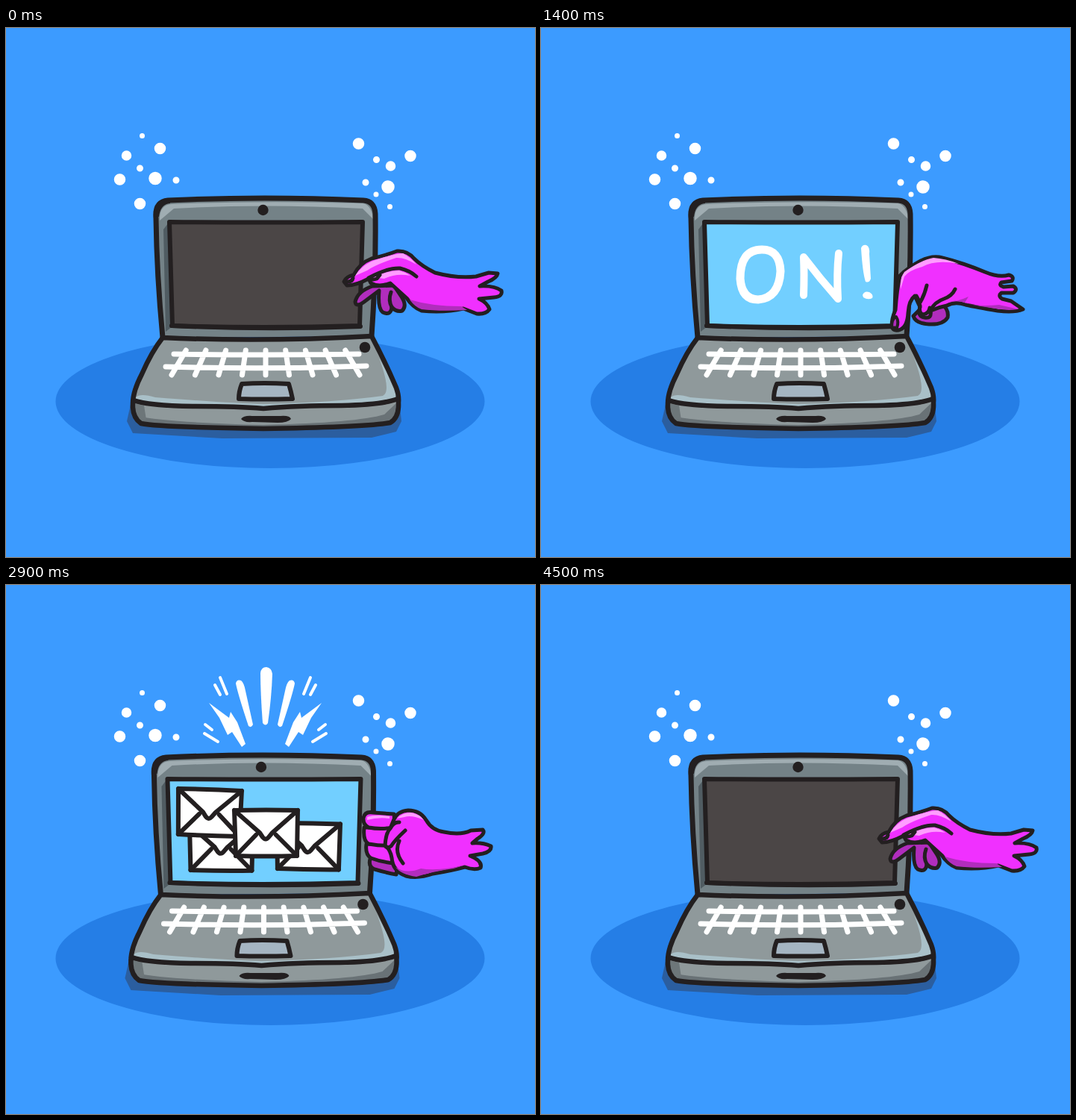
Animation, 709 px wide and 709 px high, one loop 5.5 s. Source, as an HTML page:

```html
<!DOCTYPE html>
<html lang="en">
<head>
<meta charset="utf-8">
<title>Laptop mail</title>
<style>
  html, body { margin: 0; width: 100%; height: 100%; overflow: hidden; background: #3c9bff; }
  svg { display: block; width: 100vw; height: 100vh; }
  .ink { stroke: #231f20; stroke-width: 6; stroke-linejoin: round; stroke-linecap: round; }
  .thin { stroke-width: 5; }
  .line { fill: none; }
  .dark { fill: #231f20; }
  .white { fill: #fff; }
  .chalk { fill: none; stroke: #fff; stroke-linecap: round; stroke-linejoin: round; }
  .pink { fill: #f030ff; }
  .plum { fill: #b12dbd; }
  .rose { fill: #ff9dff; }
</style>
</head>
<body>
<svg viewBox="0 0 709 709">
  <defs>
    <g id="letter" class="ink">
      <path class="white" d="M0 0Q43 -1 85 0L84 61Q43 62 2 61Z"/>
      <path class="line" d="M0 0L34 30L38 36Q42 41 46 36L51 30L85 0M2 61L29 33M84 61L56 33"/>
    </g>
    <g id="sparks" class="white">
      <path d="M308 132Q309 126 315 128Q319 131 321 142L331 187Q329 192 325 189Q311 147 308 132Z"/>
      <path d="M272 158L299 178L301 170L310 184L321 213L316 217L303 197L297 201L286 178Z"/>
      <path class="chalk" stroke-width="4" d="M287 124L296 146M280 134L287 147M267 187L276 194M266 199L284 210"/>
    </g>
  </defs>

  <rect width="709" height="709" fill="#3c9bff"/>
  <ellipse cx="354" cy="500.5" rx="287.5" ry="89.5" fill="#257ee6"/>

  <!-- bubbles: round caps, one path per size -->
  <g class="chalk">
    <path stroke-width="7" d="M182.5 144.5h0M496 223h0M514.5 239.5h0"/>
    <path stroke-width="9" d="M179.5 188h0M228 204h0M496.5 176.5h0M482 207h0"/>
    <path stroke-width="13.5" d="M161.5 171h0M515.5 185h0"/>
    <path stroke-width="15.5" d="M206.5 161.5h0M152.5 203h0M179.5 235.5h0M472.5 155h0M542 171.5h0"/>
    <path stroke-width="17.5" d="M200 201.5h0M512 213h0"/>
  </g>

  <g id="burst">
    <path class="white" d="M341 118Q342 110 349 110Q356 111 357 119Q356 150 351 185Q348 190 344 185Q341 145 341 118Z"/>
    <use href="#sparks"/>
    <use href="#sparks" transform="translate(695 0) scale(-1 1)"/>
  </g>

  <g id="laptop">
    <path fill="#2b5e9f" d="M162 527L168 500H527L530 527L523 541L490 549L290 550L170 543Z"/>
    <!-- lid -->
    <path fill="#748287" d="M210 415L201 255Q199 233 217 232Q345 226 479 231Q494 232 495 249Q496 330 490 413Z"/>
    <path fill="#a0adb2" d="M206 258Q205 237 222 236Q345 231 478 235Q490 237 492 256L478 242Q345 235 225 242Z"/>
    <path fill="#505c62" d="M211 270L217 262L223 400L214 407Z"/>
    <path class="ink line" style="stroke-width:7" d="M210 415Q202 330 201 255Q199 233 217 231Q345 225 479 231Q494 232 495 249Q496 330 490 413"/>
    <path class="dark" d="M199 252Q197 230 220 228L220 235Q207 236 205 253Z"/>
    <path id="screen" class="ink" d="M219 260Q345 261 478 260L474 399Q345 403 223 399Z"/>
    <path class="ink line" d="M222 399Q345 405 475 400"/>
    <circle class="dark" cx="344.5" cy="244" r="7.2"/>
    <!-- base -->
    <path fill="#8f999b" d="M210 415Q345 421 490 413Q509 449 523 482Q527 493 526 502Q527 522 515 529Q480 535 345 537Q205 535 181 530Q169 522 170 503Q170 487 182 464Q195 434 210 415Z"/>
    <path fill="#a9c0c8" d="M174 495Q180 489 200 495Q300 503 345 504Q440 502 505 493Q517 488 500 442L511 463L525 496Q490 507 345 510Q200 508 173 499Z"/>
    <path fill="#697276" d="M174 520Q220 529 345 532Q470 529 507 518L524 502Q528 520 515 529Q480 535 345 537Q205 535 181 530Z"/>
    <path fill="#6d7679" d="M171 503L185 506L188 525L177 526Z"/>
    <path class="ink line" style="stroke-width:6.5" d="M210 415Q345 421 490 413Q509 449 523 482Q527 493 526 502Q527 522 515 529Q480 535 345 537Q205 535 181 530Q169 522 170 503Q170 487 182 464Q195 434 210 415M171 499Q190 506 250 507Q310 507 345 510Q390 506 450 506Q505 505 525 497"/>
    <path class="dark" d="M315 524Q319 519 330 520L368 520Q380 519 382 524Q378 529 364 529L330 528Q319 529 315 524Z"/>
    <path id="keys" class="chalk" stroke-width="7"/>
    <path class="ink" fill="#a5b5c2" d="M312 497Q312 487 316 477Q345 475 379 477Q382 487 384 497Q345 498 312 497Z"/>
    <circle class="dark" cx="481" cy="428" r="7.3"/>
  </g>

  <g id="greeting" class="chalk" stroke-width="11" aria-label="ON!">
    <path d="M296 297Q267 297 267 336Q269 364 291 364Q319 362 321 326Q320 297 296 297Z"/>
    <path d="M352 358Q353 330 352 307Q374 336 398 363Q396 330 399 302" stroke-width="10"/>
    <path class="white" stroke="none" d="M429 295Q431 290 436 291Q441 293 440 303L442 336Q440 342 435 340Q431 328 429 295ZM431 358Q433 352 440 354Q446 357 444 362Q438 365 432 361Z"/>
  </g>

  <g id="mail">
    <use href="#letter" data-at="1700" transform="translate(246 321) rotate(.5)"/>
    <use href="#letter" data-at="2600" transform="translate(363 319) rotate(1)"/>
    <use href="#letter" data-at="2800" transform="translate(231 273) rotate(2)"/>
    <use href="#letter" data-at="3000" transform="translate(372 280) rotate(2)"/>
    <use href="#letter" data-at="3200" transform="translate(306 275) rotate(.5)"/>
    <use href="#letter" data-at="2300" transform="translate(306 302)"/>
  </g>

  <g id="open" class="ink thin">
    <path class="plum" d="M491 346Q471 353 468 367Q469 375 480 367L500 352Q498 376 505 381Q516 386 517 374Q523 381 531 379Q538 372 530 360L520 345Z"/>
    <path class="line" d="M516 354Q512 365 517 374"/>
    <path class="pink" d="M453 340Q456 333 466 331Q474 315 490 309Q508 305 524 299Q538 298 547 309Q557 319 575 328Q605 336 630 333L647 328L659 329Q658 335 646 340L635 346Q655 345 664 352Q666 360 654 361L634 363Q645 368 648 377Q643 384 631 383L613 376Q588 382 557 379Q545 374 537 362L515 342Q500 348 489 342L486 336Q469 345 457 345Z"/>
    <g stroke="none">
      <path class="plum" d="M541 364Q570 373 610 373L618 378Q580 380 557 377Q548 374 541 364Z"/>
      <path class="rose" d="M468 332Q479 315 498 310Q523 302 532 302Q543 308 550 317Q534 307 523 308Q496 317 484 325Z"/>
      <path class="rose" d="M491 334Q512 325 527 325Q535 327 542 332Q523 328 507 336Z"/>
    </g>
    <path class="line" d="M486 335Q512 321 528 322Q541 325 550 333M486 335Q488 339 497 336L501 331M455 340Q464 341 465 335"/>
  </g>

  <g id="point" class="ink thin">
    <path class="plum" d="M499 386Q502 396 520 397Q539 398 545 388Q547 377 537 370L515 370Z"/>
    <path class="pink" d="M470 400Q470 389 475 378Q477 350 481 332Q492 321 509 312Q525 304 538 308Q566 315 595 327Q614 335 627 331Q635 333 631 339L617 341Q613 345 620 347L633 346Q640 350 633 355L617 355Q612 359 618 363L630 366L646 377Q634 382 612 379Q583 374 569 371Q555 366 544 372Q533 374 522 379Q524 390 514 388Q504 387 508 374L501 359Q493 365 492 382Q491 400 482 404Q473 408 470 400Z"/>
    <g stroke="none">
      <path class="rose" d="M482 350Q481 335 487 327Q509 311 526 308Q542 309 560 316Q529 310 511 320Q493 325 487 333Z"/>
      <path class="plum" d="M548 367Q560 366 573 360L568 368Q584 374 614 371L640 377Q615 379 570 369Q556 363 548 367Z"/>
    </g>
    <path class="line" d="M517 345Q514 358 508 368L503 359M508 372Q506 382 512 384Q520 383 521 375M522 378Q528 367 540 363Q551 359 555 350"/>
    <path class="plum" stroke-width="4" d="M470 401Q470 389 476 387Q480 393 477 402Z"/>
  </g>

  <g id="fist" class="ink thin">
    <path class="plum" d="M482 367Q479 378 488 381Q505 386 517 388L520 360Z"/>
    <path class="pink" d="M477 347Q475 361 483 366Q496 371 514 373L516 347Z"/>
    <path class="pink" d="M474 325Q472 343 480 347Q496 350 512 349L514 325Z"/>
    <path class="pink" d="M473 312Q475 303 486 305L514 307L515 325Q495 328 480 325Q472 321 473 312Z"/>
    <path class="pink" d="M514 314Q519 303 533 302Q549 302 557 315Q565 329 581 331Q603 336 617 329L633 328Q637 333 626 340L619 346Q633 345 644 350Q645 357 633 360L616 363Q633 370 630 379Q622 383 609 378Q590 383 566 387Q546 394 530 390Q512 383 511 366Q509 354 502 349Q503 332 509 326Z"/>
    <g stroke="none">
      <path class="rose" d="M518 313Q525 305 537 305Q548 307 554 315Q538 308 528 311Z"/>
      <path class="rose" d="M478 311Q489 307 508 310L508 313Q492 311 478 315Z"/>
      <path class="plum" d="M516 378Q530 388 550 380Q574 384 610 375L594 380Q565 384 544 391Q523 388 516 378Z"/>
    </g>
    <path class="line" d="M509 326Q514 317 521 318M502 349Q504 354 510 350Q515 342 529 329M521 343Q514 358 526 373"/>
  </g>
</svg>

<script>
const LOOP = 5500, STEP = 100;
const el = id => document.getElementById(id);
const show = (node, visible) => { node.style.display = visible ? '' : 'none'; };
const within = (t, from, to) => t >= from && t < to;

// Two rows crossed by strokes that fan out towards the viewer.
let keys = 'M225 437Q350 439 473 437M214 454Q350 458 483 453';
for (let i = -4; i <= 4; i++) keys += `M${348 + 26.7 * i} 432L${348 + 31.5 * i} 465`;
el('keys').setAttribute('d', keys);

function handPose(t) {
  if (within(t, 2800, 3600)) return 'fist';
  return within(t, 500, 1600) || within(t, 3600, 4500) ? 'point' : 'open';
}

// The finger sinks towards each press, stays down for two steps and rises again.
function pressDepth(t) {
  const depth = down => 29 - 11 * Math.max(down - t, t - down - STEP, 0) / STEP;
  return Math.max(0, depth(900), depth(4000));
}

function draw(time) {
  const t = Math.floor(time / STEP) * STEP;
  const pose = handPose(t);
  const knocking = pose === 'fist';
  const shaking = within(t, 1700, 3600);
  const wave = shaking ? Math.sin((t - 3400) / STEP * Math.PI * 2 / 3) : 0;

  for (const name of ['open', 'point', 'fist']) show(el(name), name === pose);
  const handX = knocking ? 7 * wave : 0;
  const handY = pose === 'point' ? pressDepth(t) : 0;
  el(pose).setAttribute('transform', `translate(${handX} ${handY})`);

  const push = knocking ? -6 : within(t, 3600, 4200) ? -3 : shaking ? -1 : 0;
  el('laptop').setAttribute('transform', `translate(${push + 4 * wave} 0)`);
  show(el('burst'), within(t, 1700, 3500) && wave > (knocking ? -0.1 : 0.1));

  el('screen').setAttribute('fill', within(t, 1000, 4200) ? '#72cfff' : '#4b4646');
  show(el('greeting'), within(t, 1100, 1700));
  for (const letter of el('mail').children) show(letter, within(t, +letter.dataset.at, 4200));
}

const start = performance.now();
function tick() {
  draw((performance.now() - start) % LOOP);
  requestAnimationFrame(tick);
}
tick();
</script>
</body>
</html>
```
